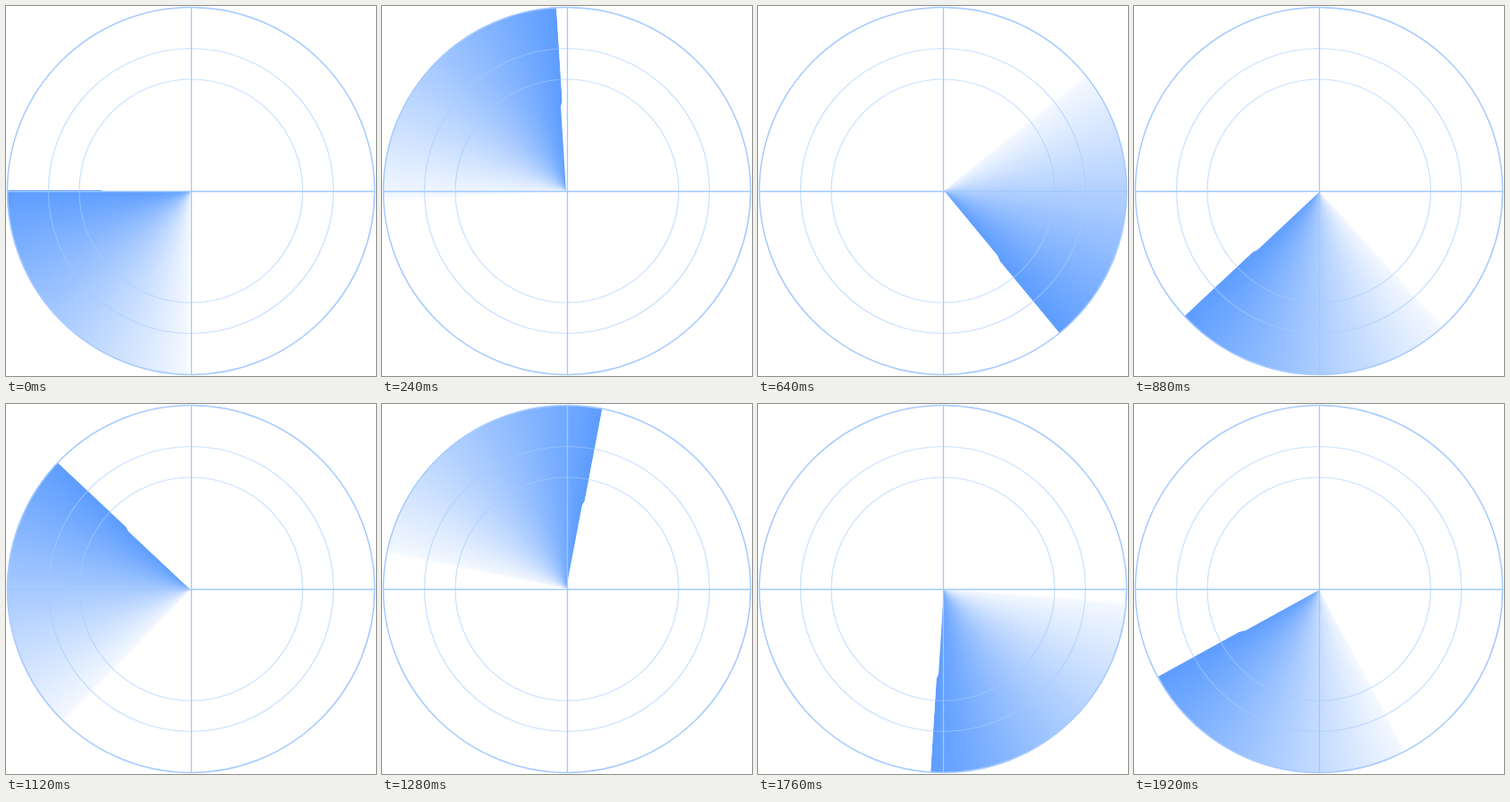
Recreate the animation shown at these times as an HTML page. Size 414 px wide and 414 px high, loop 2000 ms.

```html
<!DOCTYPE html>
<html lang="en">
<head>
<meta charset="utf-8">
<title>Radar</title>
<style>
  html, body { margin: 0; width: 100%; height: 100%; overflow: hidden; background: #fff; }
  #stage { position: relative; width: 414px; height: 414px; max-width: 100%; max-height: 100%; overflow: hidden; contain: strict; }
  #beam, svg { position: absolute; left: 0; top: 0; width: 414px; height: 414px; }
  #beam {
    background: conic-gradient(at 207px 207px, #fff 0deg, #f2f7ff 2deg, #5f9eff 89deg, #5f9eff 100deg, #fff 101deg);
    /* the leading edge has a small step halfway along */
    clip-path: path("M207 206 L302 206 L308 208 L413 208 A206 206 0 0 0 207 1 Z");
    transform-origin: 207px 207px;
  }
  svg { display: block; fill: none; stroke: #a6cbff; }
  .ring { stroke-opacity: .6; stroke-width: 1.2; }
</style>
</head>
<body>
<div id="stage">
  <div id="beam"></div>
  <svg viewBox="0 0 414 414">
    <circle class="ring" cx="207" cy="207" r="125"/>
    <circle class="ring" cx="207" cy="207" r="159.5"/>
    <path d="M1 207.5H413M207.5 1V413" stroke="#a0c8ff" stroke-width="1.3"/>
    <circle cx="207" cy="207" r="205.5" stroke-width="1.5"/>
  </svg>
</div>
<script>
  const LOOP = 2000, STEP = 80, TURNS = 2, START_ANGLE = 180;
  const beam = document.getElementById('beam');

  function draw(ms) {
    const time = Math.floor((ms % LOOP) / STEP) * STEP;
    const angle = START_ANGLE + 360 * TURNS * time / LOOP;
    beam.style.transform = `rotate(${angle}deg)`;
  }

  const start = performance.now();
  function tick() {
    draw(performance.now() - start);
    requestAnimationFrame(tick);
  }
  tick();
</script>
</body>
</html>
```
